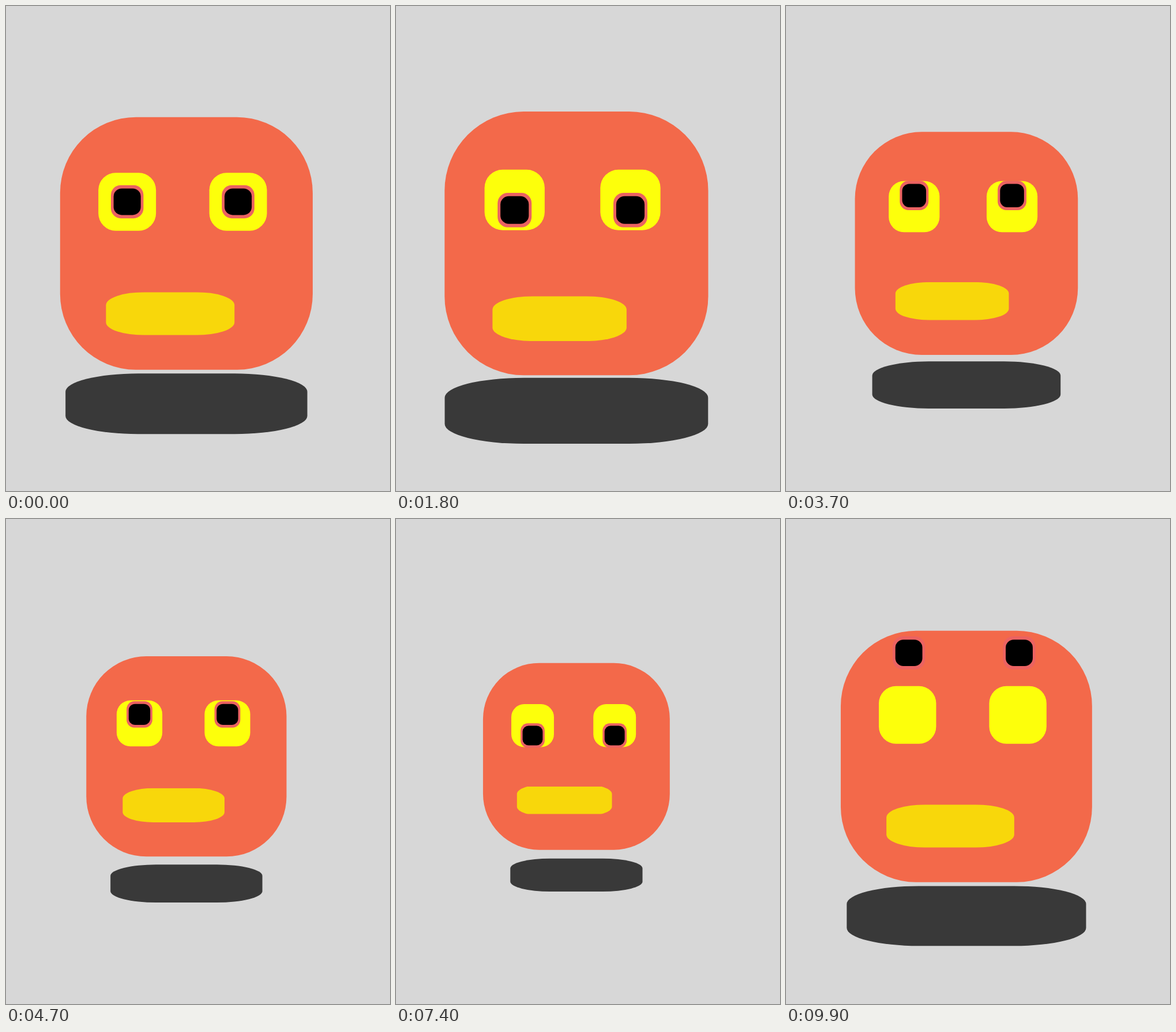
An HTML page with a canvas that plays this animation: 666 by 841 pixels, repeating every 10 s.

```html
<!DOCTYPE html>
<html lang="en">
<head>
<meta charset="utf-8">
<title>Bouncing face</title>
<style>
  html, body { margin: 0; width: 100%; height: 100%; overflow: hidden; background: #d7d7d7; }
  canvas { display: block; }
</style>
</head>
<body>
<canvas id="stage" width="666" height="841"></canvas>
<script>
const ctx = document.getElementById('stage').getContext('2d');
const LOOP = 10000, STEP = 100, SHRINK_START = 2190;
const SIZE = 457.7, HALF = SIZE / 2;

// [time, vertical offset of the pupils]
const GAZE = [[0, 0], [800, 14.2], [1500, 24.2], [2800, -24.7], [4700, -20.5],
  [7400, 24.2], [8900, -23.4], [9900, -113]];

const lerp = (a, b, k) => a + (b - a) * k;
const smooth = k => k * k * (3 - 2 * k);

// CSS "ease": cubic-bezier(.25, .1, .25, 1)
function ease(x) {
  let lo = 0, hi = 1;
  for (let i = 0; i < 24; i++) {
    const u = (lo + hi) / 2;
    if (u * (0.75 - 0.75 * u + u * u) < x) lo = u; else hi = u;
  }
  return lo * (0.3 + 2.4 * lo - 1.7 * lo * lo);
}

function faceScale(t) {
  const phase = (t - SHRINK_START + LOOP) % LOOP / (LOOP / 2);
  return phase < 1 ? lerp(1, 0.7, ease(phase)) : lerp(0.7, 1, ease(phase - 1));
}

function gaze(t) {
  const i = GAZE.findIndex(([end]) => end >= t);
  if (i < 1) return GAZE[0][1];
  const [t0, y0] = GAZE[i - 1], [t1, y1] = GAZE[i];
  return lerp(y0, y1, smooth((t - t0) / (t1 - t0)));
}

// Box around a centre, with corners rounded by 30% on each axis
function blob(cx, cy, w, h, color) {
  ctx.fillStyle = color;
  ctx.beginPath();
  ctx.roundRect(cx - w / 2, cy - h / 2, w, h, { x: w * 0.3, y: h * 0.3 });
  ctx.fill();
}

function drawEye(x, look, drift) {
  const y = -75.5;
  blob(x, y, 104.4, 105, '#fdff0b');
  blob(x + drift, y + look, 59, 60, '#eb6261');
  blob(x + drift, y + look, 49.2, 48, '#000');
}

function drawMouth(t, s) {
  const y = 130.6 - 79 * (1 - s);
  const squash = 5.5 * smooth(Math.max(0, 1 - Math.abs(t - 7400) / 1000));
  const h = 78 - 2 * squash;
  ctx.save();
  ctx.beginPath();
  ctx.rect(-HALF, y - h / 2, SIZE, h);
  ctx.clip();
  blob(-29.3, y, 232.8, 78, '#f8d70b');
  ctx.restore();
}

function draw(t) {
  const s = faceScale(t), look = gaze(t);
  const drift = 2.5 * Math.max(0, (-look - 25) / 88);
  ctx.setTransform(1, 0, 0, 1, 0, 0);
  ctx.fillStyle = '#d7d7d7';
  ctx.fillRect(0, 0, 666, 841);
  ctx.setTransform(s, 0, 0, s, 312.9, 411.7);
  blob(0, 290.5, SIZE * s, SIZE / 4 * s, '#393939');
  blob(0, 0, SIZE, SIZE, '#f3694a');
  drawMouth(t, s);
  // Both whites and pupils move together
  for (const x of [-107.3, 93.7]) drawEye(x, look, drift);
}

const start = performance.now();
function tick() {
  const t = (performance.now() - start) % LOOP;
  draw(Math.floor(t / STEP) * STEP);
  requestAnimationFrame(tick);
}
tick();
</script>
</body>
</html>
```
